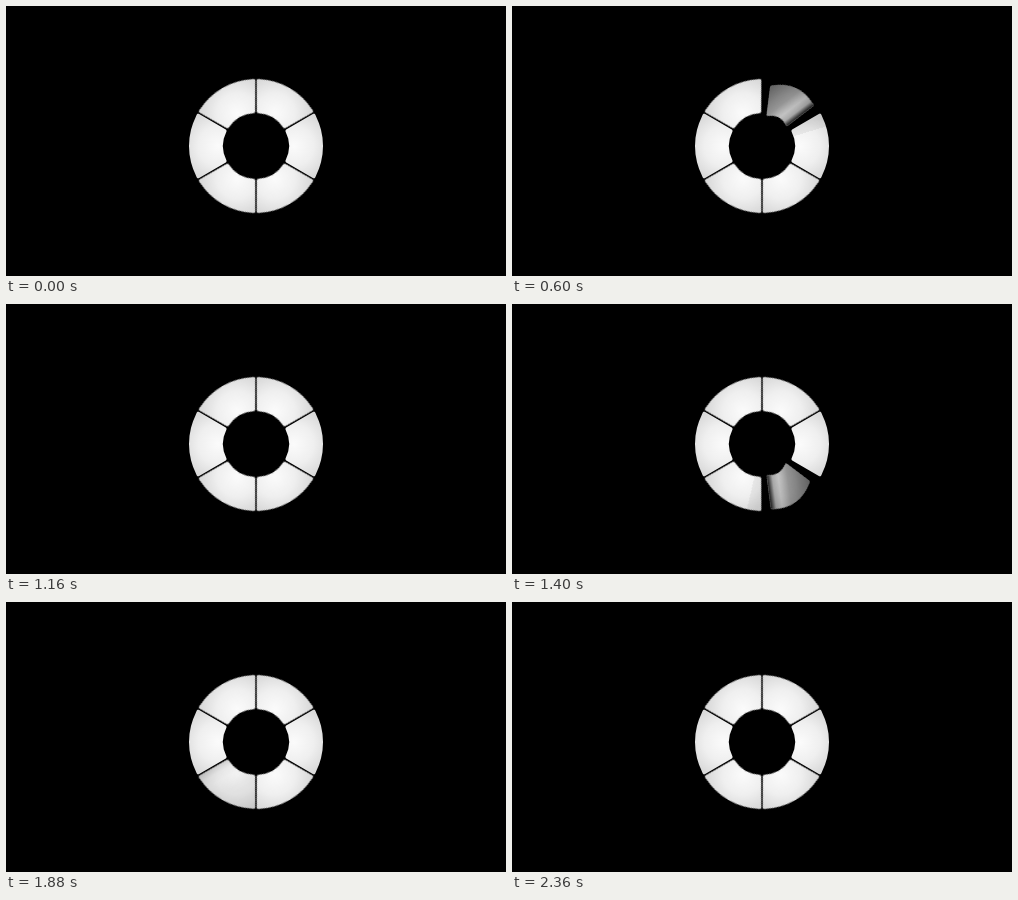
Recreate the animation shown at these times as an HTML page without scripts. Size 500 by 270 pixels, loop 2400 ms.

```html
<!DOCTYPE html>
<html lang="en">
<head>
<meta charset="utf-8">
<title>Flipping ring loader</title>
<style>
  html, body {
    margin: 0;
    width: 100%;
    height: 100%;
    overflow: hidden;
    background: #000;
  }
  .stage {
    position: relative;
    width: 500px;
    height: 270px;
    overflow: hidden;
    perspective: 570px;
    perspective-origin: 250.2px 140.2px;
  }
  .defs { position: absolute; }

  /* Each segment flips about its own radial axis, 400 ms after the one before. */
  .segment {
    --angle: calc(var(--i) * 60deg - 30deg);
    position: absolute;
    left: 180.2px;
    top: 70.2px;
    width: 140px;
    height: 140px;
    transform: rotate(var(--angle)) rotateY(0deg);
    animation: flip 2400ms infinite;
  }
  .face { fill: url(#light); }
  .cast { fill: url(#wedge); opacity: 0; }
  .leaving { fill: url(#leaving-shade); opacity: 0; animation: leave 2400ms linear infinite; }
  .returning { fill: url(#returning-shade); opacity: 0; animation: return 2400ms linear infinite; }
  .from-previous { animation: cast-previous 2400ms linear infinite; }
  .from-next { animation: cast-next 2400ms linear infinite; }
  .segment, .segment use {
    animation-delay: calc(var(--i) * 400ms - 2400ms);
  }

  @keyframes flip {
    0% {
      transform: rotate(var(--angle)) rotateY(0deg);
      animation-timing-function: cubic-bezier(.55, 0, .45, 1);
    }
    13.333% { transform: rotate(var(--angle)) rotateY(180deg); }
    13.334%, 100% { transform: rotate(var(--angle)) rotateY(0deg); }
  }
  @keyframes leave {
    0% { opacity: 0; }
    1.667% { opacity: .1; }
    3.333% { opacity: .5; }
    5%, 6.666% { opacity: 1; }
    6.667%, 100% { opacity: 0; }
  }
  @keyframes return {
    0%, 6.666% { opacity: 0; }
    6.667%, 8.333% { opacity: 1; }
    10% { opacity: .5; }
    11.667% { opacity: .15; }
    13.333%, 100% { opacity: 0; }
  }
  @keyframes cast-previous {
    0%, 89.5% { opacity: 0; }
    91%, 92.5% { opacity: 1; }
    95%, 100% { opacity: 0; }
  }
  @keyframes cast-next {
    0%, 19% { opacity: 0; }
    21%, 22.5% { opacity: 1; }
    23.5%, 100% { opacity: 0; }
  }
</style>
</head>
<body>
<div class="stage">
  <svg class="defs" width="0" height="0">
    <defs>
      <radialGradient id="light" gradientUnits="userSpaceOnUse" cx="0" cy="-38" r="40">
        <stop offset="0" stop-color="#fbfbfb"/>
        <stop offset=".5" stop-color="#efefef"/>
        <stop offset="1" stop-color="#d4d4d4"/>
      </radialGradient>
      <linearGradient id="leaving-shade" gradientUnits="userSpaceOnUse" x1="-48" y1="-28" x2="0" y2="0">
        <stop offset="0" stop-opacity=".1"/>
        <stop offset=".5" stop-opacity=".12"/>
        <stop offset=".85" stop-opacity=".4"/>
        <stop offset="1" stop-opacity=".75"/>
      </linearGradient>
      <linearGradient id="returning-shade" gradientUnits="userSpaceOnUse" x1="-48" y1="-28" x2="0" y2="0">
        <stop offset="0" stop-opacity=".55"/>
        <stop offset=".5" stop-opacity=".4"/>
        <stop offset=".72" stop-opacity=".22"/>
        <stop offset=".86" stop-opacity=".32"/>
        <stop offset="1" stop-opacity="1"/>
      </linearGradient>
      <linearGradient id="wedge" gradientUnits="userSpaceOnUse" x1="-9.56" y1="2.92" x2="0" y2="0">
        <stop offset="0" stop-opacity=".08"/>
        <stop offset="1" stop-opacity=".05"/>
        <stop offset="1" stop-opacity="0"/>
      </linearGradient>
      <path id="shape" d="M-31.45-59.15A67 67 0 0 1 31.45-59.15A1.5 1.5 0 0 1 32.1-57.1
        L16.55-30.2A1.5 1.5 0 0 1 14.6-29.6A33 33 0 0 0-14.6-29.6
        A1.5 1.5 0 0 1-16.55-30.2L-32.1-57.1A1.5 1.5 0 0 1-31.45-59.15Z"/>
    </defs>
  </svg>

  <svg class="segment" style="--i:0" viewBox="-70 -70 140 140">
    <use href="#shape" class="face"/>
    <use href="#shape" class="cast from-previous"/>
    <use href="#shape" class="cast from-next" transform="scale(-1 1)"/>
    <use href="#shape" class="leaving"/>
    <use href="#shape" class="returning" transform="scale(-1 1)"/>
  </svg>
  <svg class="segment" style="--i:1" viewBox="-70 -70 140 140">
    <use href="#shape" class="face"/>
    <use href="#shape" class="cast from-previous"/>
    <use href="#shape" class="cast from-next" transform="scale(-1 1)"/>
    <use href="#shape" class="leaving"/>
    <use href="#shape" class="returning" transform="scale(-1 1)"/>
  </svg>
  <svg class="segment" style="--i:2" viewBox="-70 -70 140 140">
    <use href="#shape" class="face"/>
    <use href="#shape" class="cast from-previous"/>
    <use href="#shape" class="cast from-next" transform="scale(-1 1)"/>
    <use href="#shape" class="leaving"/>
    <use href="#shape" class="returning" transform="scale(-1 1)"/>
  </svg>
  <svg class="segment" style="--i:3" viewBox="-70 -70 140 140">
    <use href="#shape" class="face"/>
    <use href="#shape" class="cast from-previous"/>
    <use href="#shape" class="cast from-next" transform="scale(-1 1)"/>
    <use href="#shape" class="leaving"/>
    <use href="#shape" class="returning" transform="scale(-1 1)"/>
  </svg>
  <svg class="segment" style="--i:4" viewBox="-70 -70 140 140">
    <use href="#shape" class="face"/>
    <use href="#shape" class="cast from-previous"/>
    <use href="#shape" class="cast from-next" transform="scale(-1 1)"/>
    <use href="#shape" class="leaving"/>
    <use href="#shape" class="returning" transform="scale(-1 1)"/>
  </svg>
  <svg class="segment" style="--i:5" viewBox="-70 -70 140 140">
    <use href="#shape" class="face"/>
    <use href="#shape" class="cast from-previous"/>
    <use href="#shape" class="cast from-next" transform="scale(-1 1)"/>
    <use href="#shape" class="leaving"/>
    <use href="#shape" class="returning" transform="scale(-1 1)"/>
  </svg>
</div>
</body>
</html>
```
